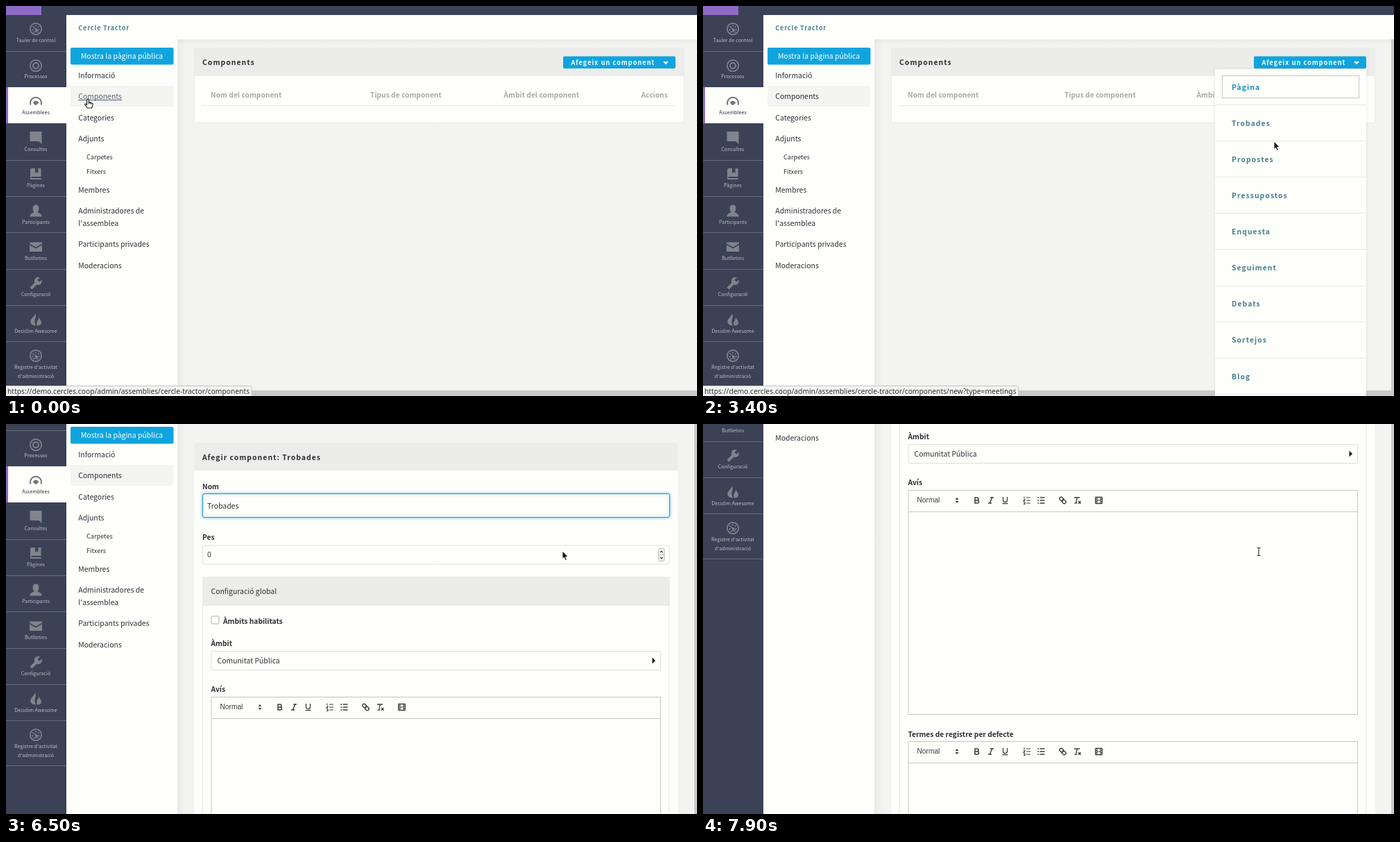
An HTML page with a canvas for the animation above (8 s loop, 996 by 562 pixels).

```html
<!DOCTYPE html>
<html lang="ca">
<head>
<meta charset="utf-8">
<title>Components</title>
<style>
html, body { margin: 0; width: 100%; height: 100%; overflow: hidden; background: #fefffb; }
canvas { display: block; width: 996px; height: 562px; }
</style>
</head>
<body>
<canvas id="stage" width="996" height="562"></canvas>
<script>
const g = document.getElementById('stage').getContext('2d');
const LOOP = 8000;
const SANS = '"Noto Sans CJK JP", "Noto Sans CJK SC", "Noto Sans", sans-serif';
const UNIT = 0.6525; // CSS pixel to font size at this zoom
const C = {
  white: '#fefffb', bg: '#f3f4f1', head: '#ececea', line: '#e6e7e4', ink: '#2b2e36',
  navy: '#3b4256', purple: '#8f6bc8', blue: '#10a4de', blueDark: '#0e8bbd',
  teal: '#477f8b', grey: '#a9aaa9', bar: '#c9cac8', icon: '#81848c', navText: '#b9bcc2'
};
const TITLE = 'Cercle Tractor';
const SCOPE = 'Comunitat Pública';
const HOST = 'demo.cercles.coop';
const BASE = 'https://' + HOST + '/admin/assemblies/cercle-tractor/';

// ---- helpers
function rect(x, y, w, h, fill) { g.fillStyle = fill; g.fillRect(x, y, w, h); }

function box(x, y, w, h, r, fill, stroke, lw = 1) {
  g.beginPath();
  g.roundRect(x, y, w, h, r);
  if (fill) { g.fillStyle = fill; g.fill(); }
  if (stroke) { g.strokeStyle = stroke; g.lineWidth = lw; g.stroke(); }
}

// y is the middle of the capitals
function text(s, x, y, o = {}) {
  const size = o.px || (o.css || 16) * UNIT;
  g.font = (o.bold ? '700 ' : '400 ') + size + 'px ' + (o.font || SANS);
  g.letterSpacing = (o.ls || 0) + 'px';
  g.textAlign = o.align || 'left';
  g.fillStyle = o.color || C.ink;
  const base = y + size * 0.36;
  g.fillText(s, x, base);
  if (o.under) rect(x, Math.round(base + 1), g.measureText(s).width - (o.ls || 0), 1, g.fillStyle);
  g.letterSpacing = '0px';
}

function poly(pts, fill, stroke, lw = 1) {
  g.beginPath();
  for (let i = 0; i < pts.length; i += 2) g.lineTo(pts[i], pts[i + 1]);
  g.closePath();
  if (fill) { g.fillStyle = fill; g.fill(); }
  if (stroke) { g.strokeStyle = stroke; g.lineWidth = lw; g.stroke(); }
}

function path(d, fill, stroke, lw = 1) {
  const p = new Path2D(d);
  if (fill) { g.fillStyle = fill; g.fill(p); }
  if (stroke) { g.strokeStyle = stroke; g.lineWidth = lw; g.stroke(p); }
}

function ring(r, lw, color) {
  g.beginPath(); g.arc(0, 0, r, 0, 7);
  g.strokeStyle = color; g.lineWidth = lw; g.stroke();
}

function dot(x, y, r, color) {
  g.beginPath(); g.arc(x, y, r, 0, 7);
  g.fillStyle = color; g.fill();
}

function at(x, y, draw) { g.save(); g.translate(x, y); draw(); g.restore(); }

// linear interpolation over rows of [time, ...values]
function track(rows, t) {
  let i = 0;
  while (i < rows.length - 1 && rows[i + 1][0] <= t) i++;
  const a = rows[i], b = rows[i + 1] || a;
  const k = b === a ? 0 : (t - a[0]) / (b[0] - a[0]);
  return a.slice(1).map((v, n) => v + (b[n + 1] - v) * k);
}

// ---- navigation
const gauge = c => {
  ring(8.2, 1.7, c);
  for (let a = 0; a < 5; a++) {
    const q = Math.PI * (0.9 + a * 0.3);
    dot(Math.cos(q) * 4.7, Math.sin(q) * 4.7, 1.1, c);
  }
  path('M-4.5 -4 L1.6 .2 L.2 2.2Z', c);
  dot(1, 1.4, 1.9, c);
  path('M-4 5 Q0 2.8 4 5', null, c, 1.4);
};

const NAV = [
  ['Tauler de control', 33, 49, gauge],
  ['Processos', 86, 101.5, c => { ring(8.2, 1.7, c); ring(4, 1.9, c); }],
  ['Assemblees', 138, 153.5, c => {
    path('M-7.5 4.5 A8 8 0 1 1 7.5 4.5', null, c, 1.9);
    path('M-4.5 1.5 Q0 -4.5 4.5 1.5 Q2.5 3.4 0 3.4 T-4.5 1.5', c);
    dot(0, 2.6, 2.4, c);
  }],
  ['Consultes', 190, 206, c => path('M-8.5 -9H8.5V5H8.5V9L4.5 5H-8.5Z', c)],
  ['Pàgines', 242, 258.5, c => {
    path('M-6 -8H-1V-1L1.2 -3L3.5 -1V-8H7.5V4H-6.5V6H7.5V8H-7Q-8 8 -8 6.5V-6Q-8 -8 -6 -8Z', c);
  }],
  ['Participants', 295, 311, c => {
    path('M0 -8.5C6 -8.5 5 0 2.4 2C4 4 8.5 3.2 8.5 8.5H-8.5C-8.5 3.2 -4 4 -2.4 2C-5 0 -6 -8.5 0 -8.5', c);
  }],
  ['Butlletins', 347, 363, c => {
    path('M-9 -6.5H9V-4.5L0 .5L-9 -4.5Z', c);
    path('M-9 -2.5L0 2.6L9 -2.5V7H-9Z', c);
  }],
  ['Configuració', 400, 415.5, c => {
    path('M-7 7L2 -2', null, c, 4);
    path('M6 -8.5A5.6 5.6 0 1 0 8.6 -5.5L5 -2.5L2.3 -5.2Z', c);
  }],
  ['Decidim Awesome', 452, 468, c => {
    path('M-1 -9C1 -4 -1 -2 -1.5 1C-2 4 -1 6 0 8.5C-7 8.5 -9 4 -7 0C-5.5 -3 -2 -5 -1 -9', c);
    path('M4.5 -4C5 0 8.5 1 8 5C7.6 8 4 8.6 1.8 8.5C-.5 3 4 1 4.5 -4', c);
  }],
  ["Registre d'activitat", 504, 520, gauge]
];
const NAV_LINES = [65, 222, 274, 326, 379, 431, 483, 548];

function nav() {
  rect(0, 13, 87, 1200, C.navy);
  for (const y of NAV_LINES) rect(0, y, 87, 1, '#656b7b');
  rect(0, 117, 87, 52, C.white);
  rect(0, 117, 3, 52, C.purple);
  NAV.forEach(([label, iy, ty, icon], i) => {
    at(43, iy, () => icon(i === 2 ? '#73767c' : C.icon));
    text(label, 43, ty, { css: 11, align: 'center', color: i === 2 ? C.ink : C.navText });
  });
  text("d'administració", 43, 533, { css: 11, align: 'center', color: C.navText });
}

// ---- side menu
const MENU = [
  ['Informació', 100], ['Components', 130.5], ['Categories', 161], ['Adjunts', 191],
  ['Carpetes', 217.5, 1], ['Fitxers', 239, 1], ['Membres', 265],
  ['Administradores de', 295], ["l'assemblea", 313.5],
  ['Participants privades', 343.5], ['Moderacions', 374]
];

function sideMenu(hover) {
  rect(87, 48, 160, 1200, C.white);
  box(93, 60, 148.5, 24.5, 2, C.blue);
  text('Mostra la pàgina pública', 167, 72.5, { align: 'center', color: '#fff' });
  box(93, 115, 148.5, 30, 2, '#f4f4f2');
  for (const [s, y, sub] of MENU)
    text(s, sub ? 116 : 104.3, y, {
      css: sub ? 14 : 16, under: s === hover,
      color: s === hover ? '#596071' : C.ink
    });
}

function backdrop() {
  rect(247, 48, 749, 1200, C.bg);
  let s = g.createLinearGradient(247, 0, 259, 0);
  s.addColorStop(0, 'rgba(60,70,60,.05)'); s.addColorStop(1, 'rgba(60,70,60,0)');
  rect(247, 48, 12, 1200, s);
  s = g.createLinearGradient(0, 48, 0, 56);
  s.addColorStop(0, 'rgba(60,70,60,.05)'); s.addColorStop(1, 'rgba(60,70,60,0)');
  rect(247, 48, 749, 8, s);
}

function header() {
  rect(0, 0, 996, 13, C.navy);
  rect(0, 0, 51, 13, C.purple);
  rect(87, 13, 909, 35, C.white);
  text(TITLE, 104.3, 32, { css: 14, bold: 1, ls: 0.8, color: C.teal });
}

// ---- component list
function listPage(v) {
  const d = v.open ? 9 : 0;
  box(271.5, 60.5, 706 - d, 107.5, 1, C.white, '#ebece9');
  rect(271, 60, 706.5 - d, 41, C.head);
  text('Components', 283, 81, { bold: 1, ls: 1 });
  const th = { bold: 1, color: C.grey, px: 10.25 };
  text('Nom del component', 295, 128.5, th);
  text('Tipus de component', v.open ? 521 : 525, 128.5, th);
  text('Àmbit del component', v.open ? 711.5 : 717.5, 128.5, th);
  text('Accions', 915.5 - d, 128.5, th);
  rect(283, 143, 682 - d, 1, C.line);

  box(803 - d, 72.5, 162, 17.5, 2, v.dark ? C.blueDark : C.blue);
  if (v.focus) {
    g.setLineDash([1, 1]);
    box(803.5, 72.5, 161, 17.5, 1, null, '#9fd3e8');
    g.setLineDash([]);
  }
  text('Afegeix un component', 814.5 - d, 82, { css: 14, bold: 1, ls: 1.05, color: '#fff' });
  poly([947 - d, 80, 955 - d, 80, 951 - d, 84.5], '#fff');

  rect(247, 554, 749, 8, C.bar);
  if (v.open) {
    rect(992, 48, 4, 514, C.bar);
    dropdown(v);
  }
}

const TYPES = ['Pàgina', 'Trobades', 'Propostes', 'Pressupostos', 'Enquesta',
  'Seguiment', 'Debats', 'Sortejos', 'Blog'];

function dropdown(v) {
  g.save();
  g.shadowColor = 'rgba(0,0,0,.12)'; g.shadowBlur = 3;
  rect(738, 91, 218, 480, C.white);
  g.restore();
  TYPES.forEach((s, i) => {
    const y = 117 + i * 52.1, on = i === v.picked;
    rect(738, Math.round(y + 25), 218, 1, C.line);
    text(s, 762, y, {
      bold: 1, ls: 1.03, under: s === v.over,
      color: on && i === 0 ? '#1b8fbd' : C.teal
    });
    if (on) {
      g.setLineDash([1, 1]);
      box(748.5, Math.round(y - 17) + 0.5, 197, 32, 0, null, '#8b8f90');
      g.setLineDash([]);
    }
  });
}

// ---- new component form
const label = (s, x, y) => text(s, x, y, { bold: 1, px: 10.25 });

function editor(y) {
  box(296, y + 0.5, 647.5, 323, 0, C.white, '#c6c7c5');
  rect(296, y + 31, 647.5, 1, '#c6c7c5');
  const m = y + 15, k = '#3b3c3e';
  text('Normal', 308.5, m - 0.5, { px: 10.2, font: '"Liberation Sans", Arial, sans-serif', color: k });
  poly([363.5, m - 1, 368.5, m - 1, 366, m - 4], k);
  poly([363.5, m + 1, 368.5, m + 1, 366, m + 4], k);
  at(394.5, m, () => path('M-2.5 -4H.5A2 2 0 0 1 .5 0H-2.5ZM-2.5 0H1A2 2 0 0 1 1 4H-2.5Z', null, k, 1.5));
  at(415, m, () => path('M-1 -4H4M-4 4H1M1.7 -4L-1.7 4', null, k, 1.4));
  at(435.5, m, () => path('M-3 -5V-.5A3 3 0 0 0 3 -.5V-5M-4 4.7H4', null, k, 1.3));
  at(467, m, () => path('M-1 -4H5M-1 0H5M-1 4H5M-4 -5.5V-2.5M-5 -1H-3L-5 1.2H-3M-5 3H-3V5.4H-5', null, k, 1.1));
  at(487.5, m, () => {
    path('M-2 -4H5M-2 0H5M-2 4H5', null, k, 1.3);
    for (const q of [-4, 0, 4]) dot(-4.3, q, 0.9, k);
  });
  at(518.5, m, () => {
    g.rotate(Math.PI / 4);
    box(-5.5, -2.3, 6, 4.6, 2.3, null, k, 1.4);
    box(-0.5, -2.3, 6, 4.6, 2.3, null, k, 1.4);
  });
  at(539.5, m, () => path('M-4.5 -4H3.5M-.2 -4L-2 4M-4 4.2H-.5M1.5 1L5 4.8M5 1L1.5 4.8', null, k, 1.3));
  at(570.5, m, () => {
    box(-4.8, -4.5, 9.6, 9, 0.5, null, k, 1.3);
    path('M-2.6 -4.5V4.5M2.6 -4.5V4.5M-2.6 0H2.6M-4.8 -1.5H-2.6M-4.8 1.5H-2.6M2.6 -1.5H4.8M2.6 1.5H4.8', null, k, 1.1);
  });
}

function formPage(v) {
  rect(271.5, 83, 697, 1100, C.white);
  rect(271.5, 83, 697, 40, C.head);
  text('Afegir component: Trobades', 283, 104, { bold: 1, ls: 1 });

  label('Nom', 283, 146);
  g.save();
  g.shadowColor = 'rgba(20,140,200,.55)'; g.shadowBlur = 4;
  box(283.5, 156.5, 673, 34, 2.5, C.white, '#2a95c2');
  g.restore();
  text('Trobades', 290, 174);
  if (v.caret) rect(290, 166, 1, 16, '#222');

  label('Pes', 283, 219.5);
  box(283.5, 231, 672.5, 27, 2, C.white, '#dedfdc');
  text('0', 290, 244.5);
  box(940.5, 235.5, 8.5, 18, 2, '#f5f5f3', '#a9aaa9', 0.8);
  rect(940.5, 244.3, 8.5, 0.7, '#a9aaa9');
  at(944.8, 244.5, () => path('M-2 -3.4L0 -5.4L2 -3.4M-2 3.4L0 5.4L2 3.4', null, '#333', 1.1));

  box(283.5, 276.5, 672.5, 900, 2, C.white, C.line);
  box(283, 276, 673.5, 42, [2, 2, 0, 0], C.head);
  text('Configuració global', 295.5, 297.5);
  box(296, 333, 11, 11, 1.5, v.boxHover ? '#ececea' : C.white, '#a6a7a8', 0.9);
  label('Àmbits habilitats', 313, 340);
  label('Àmbit', 295.5, 372);
  box(296, 383.5, 647.5, 27, 2, C.white, '#dedfdc');
  text(SCOPE, 304.5, 397);
  poly([931.5, 392.5, 936, 397, 931.5, 401.5], '#1d1d1d');
  label('Avís', 295.5, 438.5);
  editor(449);
  label('Termes de registre per defecte', 295.5, 801);
  editor(811);
  rect(992, 48, 4, 1200, C.bar);
}

// ---- pointer
const CURSOR = {
  arrow() {
    poly([0, 0, 0, 11.5, 2.5, 9.3, 4.4, 13.5, 6.4, 12.6, 4.6, 8.6, 8, 8.3], '#161616', '#fff', 0.9);
  },
  hand() {
    path('M-1.4 1Q0 -.8 1.2 1V5Q2.4 4.2 3.3 5.4Q4.7 4.6 5.3 6Q7 5.6 7 7.4Q7 10.5 5.6 13H-.8' +
      'Q-2 10.6 -4.4 8.2Q-4.4 6.4 -2.6 7.2L-1.4 8.4Z', '#fff', '#1c1c1c', 1.1);
    path('M1.2 5V7.5M3.3 5.4V7.5M5.2 6V7.8', null, '#1c1c1c', 0.8);
  },
  beam() {
    path('M-2.5 -5.5H-.7L0 -4.8L.7 -5.5H2.5M0 -5V5M-2.5 5.5H-.7L0 4.8L.7 5.5H2.5', null, '#2a2a2a', 1.1);
  }
};

const MOVE = [
  [0, 118, 134], [500, 118, 134], [600, 123, 172], [700, 126, 216], [800, 126, 216],
  [900, 372, 267], [1000, 372, 267], [1300, 640, 205], [1600, 873, 94], [2000, 873, 94],
  [2100, 876, 88], [2300, 878, 85], [2600, 878, 85], [2900, 835, 118], [3100, 815, 155],
  [3200, 816, 168], [3300, 816, 168], [3400, 823, 195], [3700, 844, 208], [4000, 799, 174],
  [5400, 799, 174], [5500, 798, 175], [6300, 798, 175], [6500, 802, 183], [7200, 802, 183],
  [7300, 801, 184]
];
const SCROLL = [[0, 0], [6300, 0], [6900, 168], [7200, 283], [7400, 319], [7600, 332], [7800, 332], [7900, 354]];
const SHAPES = [
  [0, 'hand'], [600, 'arrow'], [700, 'hand'], [900, 'arrow'], [2100, 'hand'], [2700, 'arrow'],
  [2900, 'hand'], [3000, 'arrow'], [3200, 'hand'], [3400, 'arrow'], [3900, 'hand'],
  [5500, 'beam'], [6400, 'arrow'], [7300, 'beam']
];
const STATUS = [
  [0, BASE + 'components'], [700, BASE + 'attachment_collections'], [1100, ''],
  [2900, BASE + 'components/new?type=pages'], [3200, BASE + 'components/new?type=meetings'],
  [3600, ''], [3900, BASE + 'components/new?type=meetings'], [5200, HOST], [5400, '']
];
const latest = (rows, t) => rows.filter(r => r[0] <= t).pop()[1];
const within = (t, a, b) => t >= a && t < b;

function status(s) {
  if (!s) return;
  const o = { px: 10.28, font: '"Noto Sans", "Open Sans", sans-serif', color: '#303234' };
  g.font = '400 ' + o.px + 'px ' + o.font;
  const w = s === HOST ? 235 : g.measureText(s).width + 5;
  box(-2, 547.5, w + 2, 18, [0, 3, 0, 0], '#f4f5f2', '#c3c4c2');
  text(s, 2, 555, o);
}

function draw(now) {
  const t = Math.floor((now % LOOP) / 100) * 100;
  const form = t >= 5500;
  const y = Math.round(track(SCROLL, t)[0]);
  rect(0, 0, 996, 562, C.white);

  at(0, -y, () => {
    backdrop();
    header();
    nav();
    sideMenu(t < 600 ? 'Components' : within(t, 700, 900) ? 'Carpetes' : '');
    if (form) formPage({ caret: t < 6500, boxHover: within(t, 6700, 7100) });
    else listPage({
      open: t >= 2500,
      dark: within(t, 2100, 3000),
      focus: within(t, 2300, 2500),
      picked: t < 4500 ? 0 : 1,
      over: within(t, 2900, 3000) ? 'Pàgina' : within(t, 3200, 3400) || t >= 3900 ? 'Trobades' : ''
    });
  });

  status(latest(STATUS, t));
  const [cx, cy] = track(MOVE, t);
  at(cx, cy, CURSOR[latest(SHAPES, t)]);
}

function tick() {
  draw(performance.now());
  requestAnimationFrame(tick);
}
tick();
</script>
</body>
</html>
```
